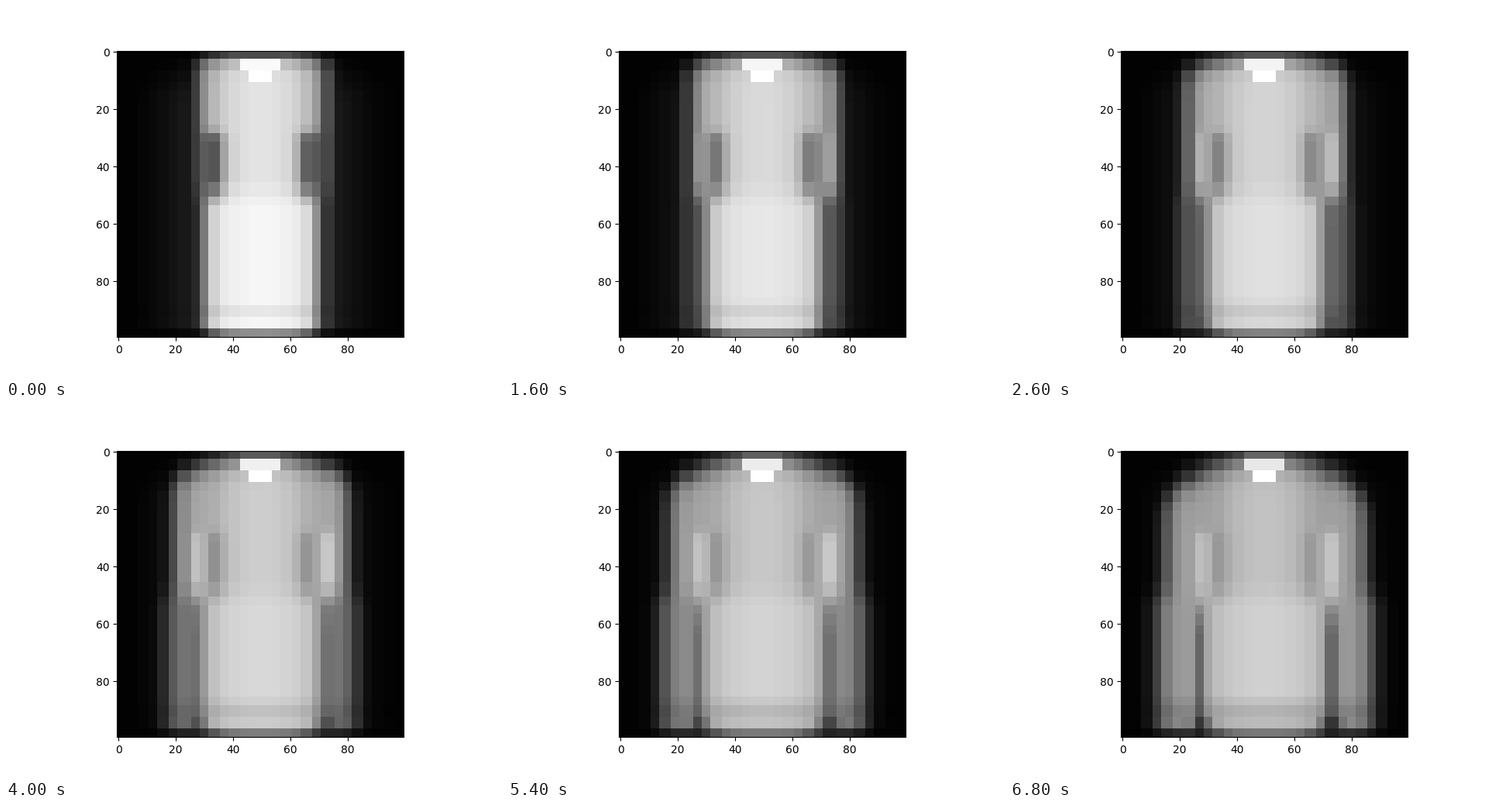
Write a matplotlib script that moves like this. It is 640 by 480 pixels and loops after 7200 ms.

```python
import numpy as np
import matplotlib.pyplot as plt
from matplotlib.animation import FuncAnimation

STEPS, STEP_MS, LAST = 36, 200, 34
STILL = (7, 10, 12, 21, 26, 29, 35)     # steps that repeat the one before
CELLS, SIZE = 28, 100
AXIS = 13.6                             # column of the garment's centre line

index = np.arange(CELLS)
row, col = np.meshgrid(index, index, indexing="ij")
dist = np.abs(col - AXIS)

# Uneven cell borders left by enlarging the small picture.
edges = np.round(index * SIZE / CELLS) + ((index % 7 == 0) & (index > 0))
edges[1], edges[-1] = 3, 97
cell_of = np.searchsorted(edges, np.arange(SIZE), side="right") - 1


def ease(p, start, end, bend=0.0):
    return start + (end - start) * (p + bend * p * (1 - p))


def soft(x, width):
    return 1 / (1 + np.exp(-x / width))


def bump(centre, width):
    return np.exp(-((dist - centre) / width) ** 2)


def ramp(low, high):
    x = np.clip((row - low) / (high - low), 0, 1)
    return x * x * (3 - 2 * x)


def upper_part(p, reach):
    """Chest and short sleeves, with a darker fold under each arm."""
    dome = np.maximum(1 - .007 * dist ** 2, .83)
    cloth = ease(p, 227, 194, .3) * dome * soft(reach - dist, .55)
    fold = 1 - ease(p, .55, .10, .9) * bump(4.8, 1.2)
    cuff = 1 + .27 * (1 - (1 - p) ** 4) * bump(6.1, .9)
    waist = ramp(6.5, 8.5)
    return cloth * (1 - waist + waist * fold * cuff)


def lower_part(p, reach):
    """Skirt panel, and long sleeves that fade in beside it."""
    panel = ease(p, 246, 208, .85) * (1 - .0035 * dist ** 2)
    sleeve = ease(p, 50, 158, .4) * soft(reach + .7 - dist, .6)
    sleeve *= 1 - .4 * p ** 2 * bump(6.5, .6) * ramp(13, 18)
    return sleeve + (panel - sleeve) * soft(5.5 - dist, .4)


def garment(step):
    p = step / LAST
    reach = ease(p, 6.2, 9.7, .24)
    skirt = ramp(12, 15)
    cells = upper_part(p, reach) * (1 - skirt) + lower_part(p, reach) * skirt

    # Shoulders slope more as the sleeves widen.
    slope = .15 + ease(p, .012, .04) * dist ** 2
    cells *= soft(row - slope, ease(p, .4, .7))
    halo = 45 * np.exp(-(dist / 9) ** 3) * ramp(-1, 5)
    cells = np.maximum(cells, halo)

    cells[0, 12:16] = ease(p, 75, 100)
    cells[1, 12:16] = ease(p, 250, 232)
    cells[2, 13:15] = 255

    cells[24] *= ease(p, 1, .94)
    cells[25] *= ease(p, .94, .86)
    cells[26] *= ease(p, 1, .9) - .4 * p * bump(6.3, 1)[26]
    cells[27] *= .3 + .28 * soft(4.6 - dist[27], .6)
    return np.clip(cells, 2, 255)[np.ix_(cell_of, cell_of)]


fig, ax = plt.subplots(figsize=(6.4, 4.8), dpi=100)
picture = ax.imshow(garment(0), cmap="gray", vmin=0, vmax=255)


def update(step):
    picture.set_data(garment(step - 1 if step in STILL else step))
    return [picture]


anim = FuncAnimation(fig, update, frames=STEPS, interval=STEP_MS,
                     repeat=True, repeat_delay=0)
plt.show()
```
